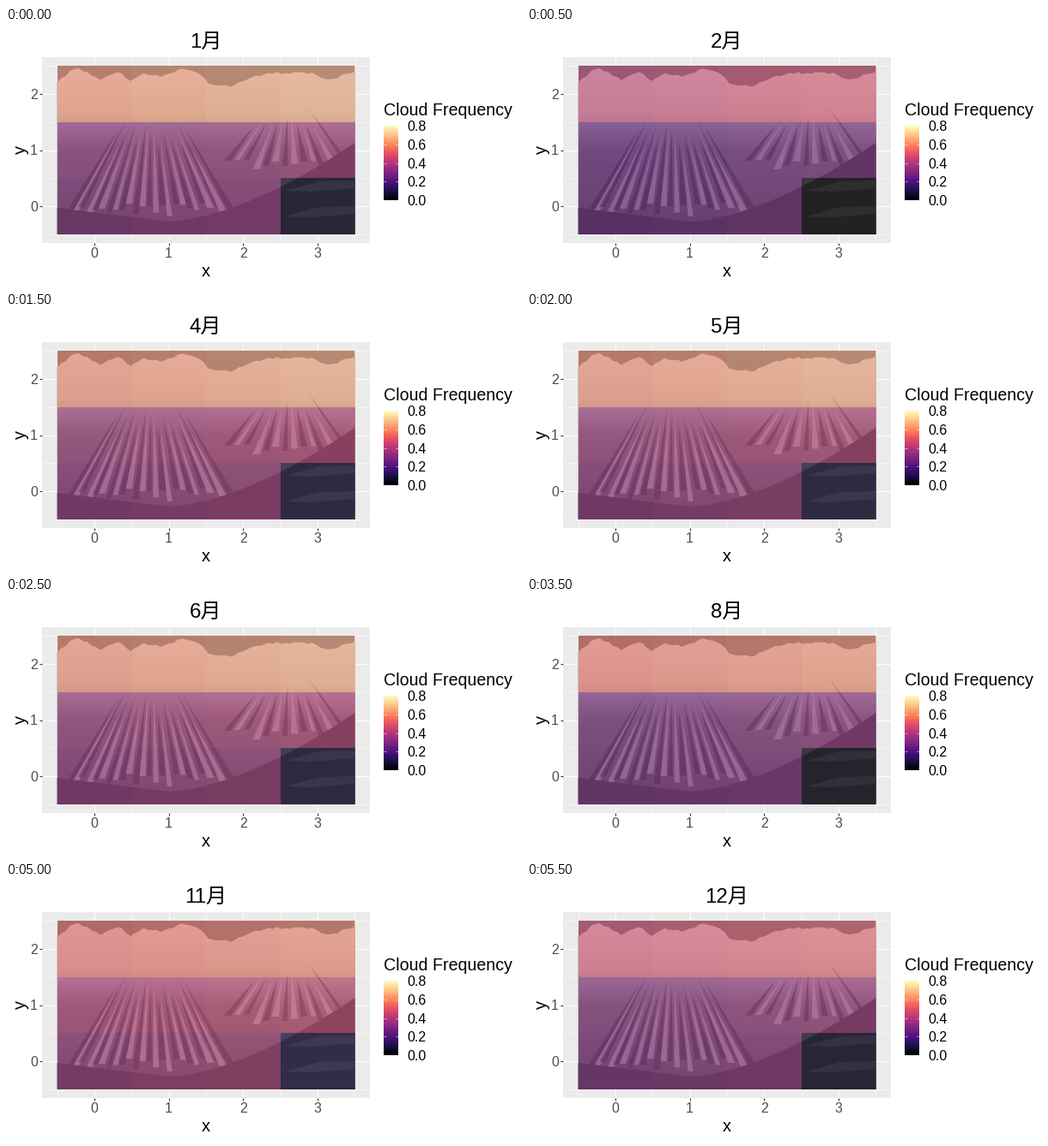
Recreate the animation shown at these times as a matplotlib script. Size 600x300 px, loop 6 s.

```python
import numpy as np
import matplotlib.pyplot as plt
from matplotlib.animation import FuncAnimation
from matplotlib.patches import Polygon, Rectangle

DPI = 100
PT = 72 / DPI
plt.rcParams["font.family"] = ["Liberation Sans", "Noto Sans CJK JP"]

fig = plt.figure(figsize=(6, 3), dpi=DPI, facecolor="white")
ax = fig.add_axes([0, 0, 1, 1])
ax.axis("off")

LEFT, RIGHT, TOP, BOTTOM = 59.65, 406.35, 44, 241
CELL_W, CELL_H = (RIGHT - LEFT) / 4, (BOTTOM - TOP) / 3
MAGMA = plt.get_cmap("magma")


def label(x, y, text, size, **style):
    return ax.text(x, y, text, fontsize=size * PT, va="baseline", **style)


def line(xs, ys, color, width, z=1):
    ax.plot(xs, ys, color=color, lw=width * PT, zorder=z, solid_capstyle="butt")


def shape(points, tone, alpha=1.0):
    patch = Polygon(points, fc=str(tone / 255), ec="none", alpha=alpha, zorder=3)
    return ax.add_patch(patch)


def box(x0, y0, x1, y1, color, z):
    ax.add_patch(Rectangle((x0, y0), x1 - x0, y1 - y0, fc=color, ec="none", zorder=z))


def draw_panel(x0=42, y0=34, x1=424, y1=251):
    box(x0, y0, x1, y1, "#EBEBEB", 0)
    for i in range(5):
        x = LEFT + i * CELL_W
        line([x, x], [y0, y1], "white", 0.55)
    for i in range(4):
        y = BOTTOM - i * CELL_H
        line([x0, x1], [y, y], "white", 0.55)
    for i in range(4):
        x = LEFT + (i + 0.5) * CELL_W
        line([x, x], [y0, y1], "white", 1.07)
        line([x, x], [y1, y1 + 2.75], "#333333", 1.07)
        label(x, 268, str(i), 16, color="#4D4D4D", ha="center")
    for i in range(3):
        y = BOTTOM - (i + 0.5) * CELL_H
        line([x0, x1], [y, y], "white", 1.07)
        line([x0 - 2.75, x0], [y, y], "#333333", 1.07)
        label(36.8, y + 5.7, str(i), 16, color="#4D4D4D", ha="right")
    label(233, 290, "x", 20, ha="center")
    label(23, 142, "y", 20, ha="center", rotation=90, rotation_mode="anchor")


def draw_gullies(summit, feet, foot_y, rng):
    """Snow gullies with rock ribs between them, fanning out below a summit."""
    sx, sy = summit
    for i, foot in enumerate(feet):
        tone, alpha = (200, 0.7) if i % 2 else (55, 0.55)
        start = rng.uniform(0.35, 0.55)
        end_y = foot_y - rng.uniform(0, 16)
        half = rng.uniform(2.5, 4.5)
        shape([(sx + start * (foot - sx), sy + start * (end_y - sy)),
               (foot + half, end_y), (foot - half, end_y)], tone, alpha)


def draw_mountains():
    rng = np.random.default_rng(4)
    box(LEFT, TOP, RIGHT, BOTTOM, "#69727C", 2)

    peaks = [(LEFT, 62), (82, 46), (111, 60), (130, 50), (147, 62), (160, 52),
             (180, 57), (203, 48), (222, 50), (238, 66), (262, 68), (300, 53),
             (355, 52), (378, 61), (RIGHT, 50)]
    xs = np.linspace(LEFT, RIGHT, 70)
    ys = np.interp(xs, *zip(*peaks)) + rng.uniform(-1.5, 1.5, xs.size)
    outline = shape([*zip(xs, ys), (RIGHT, BOTTOM), (LEFT, BOTTOM)], 130)
    tones = np.interp(np.linspace(0, 1, 100), [0, 0.28, 0.5, 1],
                      [208, 190, 128, 95])[:, None]
    slope = ax.imshow(tones, cmap="gray", vmin=0, vmax=255, aspect="auto",
                      extent=(LEFT, RIGHT, BOTTOM, TOP), zorder=3)
    slope.set_clip_path(outline)

    draw_gullies((170, 50), np.linspace(72, 262, 25), 220, rng)
    draw_gullies((330, 62), np.linspace(258, 392, 13), 166, rng)

    # Dark foreground slope rising to the right, with two pale ledges
    xs = np.linspace(LEFT, RIGHT, 40)
    rise = np.clip((xs - 190) / (RIGHT - 190), 0, 1)
    ys = 226 - 92 * rise ** 1.6 - 16 * np.clip((190 - xs) / 130, 0, 1)
    shape([*zip(xs, ys), (RIGHT, BOTTOM), (LEFT, BOTTOM)], 72)
    for y in (182, 212):
        shape([(325, y + 8), (365, y - 3), (RIGHT, y - 4), (RIGHT, y + 5), (355, y + 9)],
              115, 0.6)


def draw_legend(x0=440, x1=457, top=114.5, bottom=200.9):
    label(x0, 102, "Cloud Frequency", 19.6)
    ax.imshow(np.linspace(1, 0, 256)[:, None], cmap=MAGMA, aspect="auto",
              extent=(x0, x1, bottom, top), zorder=2)
    tick = (x1 - x0) / 5
    for i in range(5):
        y = bottom - i * (bottom - top) / 4
        label(467, y + 5.9, f"{i * 0.2:.1f}", 16)
        for start in (x0, x1 - tick):
            line([start, start + tick], [y, y], "white", 0.55, 3)


# Colour-scale positions for the sky row and the slopes through the year
KEY_MONTHS = [1, 2, 4, 6, 8, 10, 12]
SKY = [.79, .58, .77, .77, .72, .78, .62]
SLOPES = [.45, .33, .50, .49, .39, .65, .43]


def cloud_grid(month):
    sky = np.interp(month, KEY_MONTHS, SKY)
    slopes = np.interp(month, KEY_MONTHS, SLOPES)
    foot = 0.39 + 0.7 * (slopes - 0.4)
    grid = np.array([sky, slopes, foot])[:, None] + 0.02 * (np.arange(4) - 1.5)
    grid[2, 3] = max(0, 0.65 * (slopes - 0.33))  # the nearest corner stays clear
    return grid


draw_panel()
draw_mountains()
draw_legend()
title = label(232.6, 23, "", 24, ha="center")
cells = ax.imshow(cloud_grid(1), cmap=MAGMA, vmin=0, vmax=1, alpha=0.52,
                  interpolation="nearest", aspect="auto",
                  extent=(LEFT, RIGHT, BOTTOM, TOP), zorder=5)
ax.set(xlim=(0, 600), ylim=(300, 0))


def update(frame):
    month = frame + 1
    title.set_text(f"{month}月")
    cells.set_data(cloud_grid(month))
    return title, cells


anim = FuncAnimation(fig, update, frames=12, interval=500, repeat=True,
                     repeat_delay=0, blit=False)
plt.show()
```
